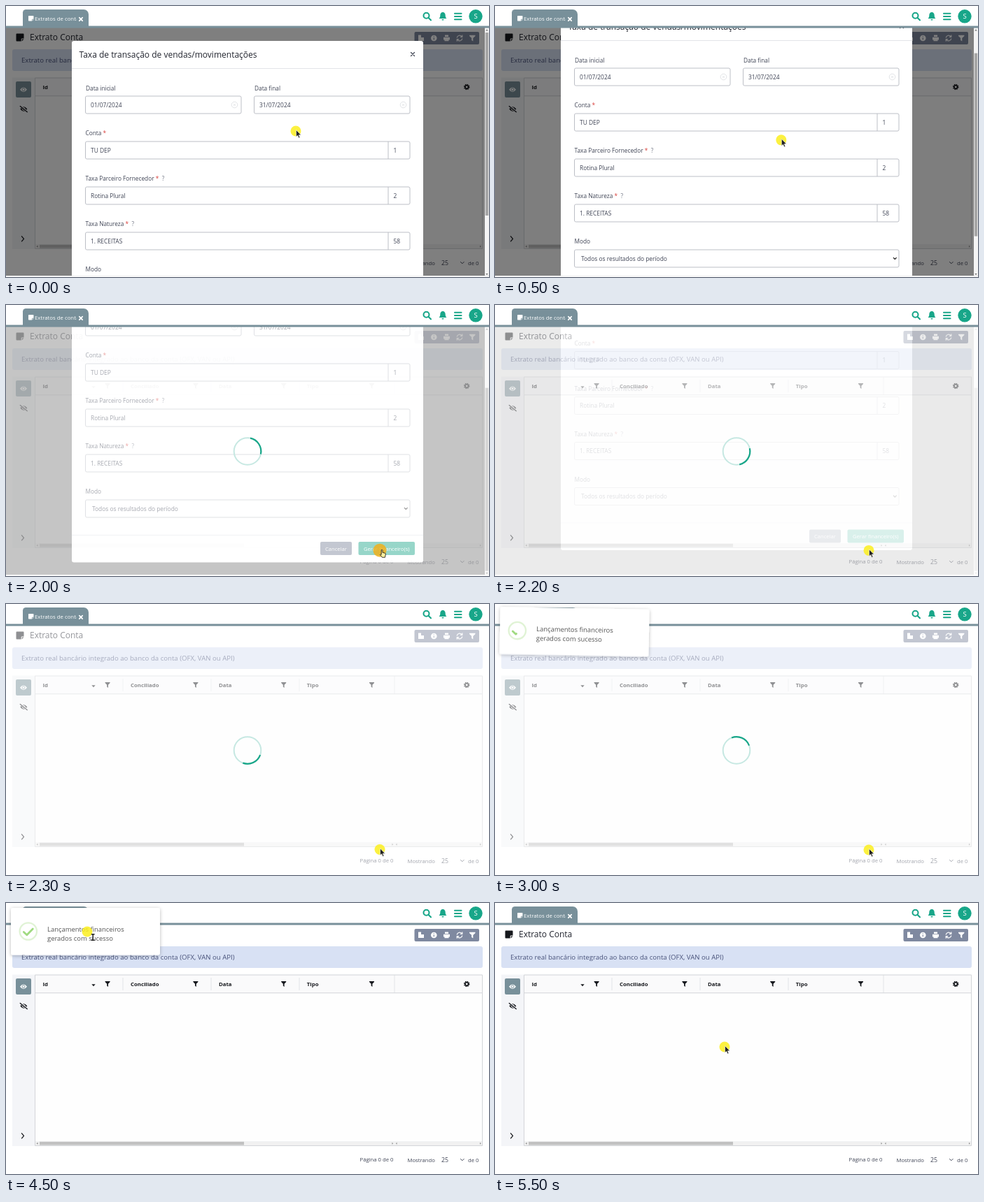
These frames come from a looping animation (690x388 px, 6.9 s). An HTML page:

```html
<!DOCTYPE html>
<html lang="pt-BR">
<head>
<meta charset="utf-8">
<title>Extrato Conta</title>
<style>
  html, body { margin: 0; width: 100%; height: 100%; overflow: hidden; background: #fff; }
  svg { display: block; }
  #stage { width: 100%; height: 100%; font: 8.3px "Open Sans", "Noto Sans", sans-serif; fill: #3f4455; }
  .h { font-size: 12px; font-weight: 500; fill: #22252f; }
  .th { font-size: 7.8px; font-weight: 700; fill: #16181d; }
  .val { font-size: 8.4px; }
  .foot { font-size: 7.7px; }
  .btn { font-size: 7.6px; fill: #fff; }
  .box { fill: #fff; stroke: #bcbfc6; }
  .line { fill: none; stroke: #e2e4e8; }
  .ink { fill: #16181d; }
  .white { fill: #fff; }
  .green { fill: #18a689; }
  .req { fill: #d9433f; }
  .hint { fill: #767b88; }
  .stroke { fill: none; stroke-linecap: round; stroke-linejoin: round; }
</style>
</head>
<body>
<svg id="stage" viewBox="0 0 690 388">
  <defs>
    <clipPath id="tabClip"><rect x="41" y="8" width="59.5" height="20"/></clipPath>
    <clipPath id="pageClip"><rect y="31" width="690" height="355.5"/></clipPath>
    <filter id="shadow" x="-10%" y="-20%" width="120%" height="140%">
      <feDropShadow dx="0" dy="1" stdDeviation="2.5" flood-opacity=".28"/>
    </filter>
    <path id="funnel" d="M0 0h7v1L4.4 3.8V8L2.6 6.6V3.8L0 1z"/>
    <path id="note" d="M1 0h9a1 1 0 0 1 1 1v6H8.2a1 1 0 0 0-1 1v3H1a1 1 0 0 1-1-1V1a1 1 0 0 1 1-1zM8.2 8H11L8.2 11z"/>
    <g id="eye">
      <path d="M-5 0Q0-6.6 5 0Q0 6.6-5 0z"/>
      <circle r="2" fill="none" stroke="var(--iris)" stroke-width=".9"/>
    </g>
  </defs>

  <!-- page -->
  <use href="#note" x="14.5" y="39.5" class="ink"/>
  <text x="34" y="49.2" class="h">Extrato Conta</text>
  <rect x="583.5" y="37" width="92.5" height="18" rx="2" fill="#7f89a0"/>
  <g class="white">
    <path d="M589 41.5h4v3.5h4v5h-8z"/>
    <circle cx="611.3" cy="46" r="4.3"/>
    <path d="M627 41.5h5v2.5h-5zM625 44.8h9v3.7h-1.5v1.7h-6v-1.7H625z"/>
    <use href="#funnel" transform="translate(662 41.8) scale(1.2 1.08)"/>
  </g>
  <path d="M611.3 45.5v2.8M611.3 43.3v.9" stroke="#7f89a0" stroke-width="1.2"/>
  <path d="M644.3 45.2a3.8 3.8 0 0 1 6.6-1.8m.9-1.6v2.5h-2.5M651.700 46.800a3.800 3.800 0 0 1-6.600 1.800m-.9 1.600v-2.500h2.500" class="stroke" stroke="#fff" stroke-width="1.2"/>
  <rect x="9" y="62" width="672" height="31" rx="3" fill="#d8e1f4"/>
  <text x="22" y="80.8" font-size="9.62" fill="#48527a">Extrato real bancário integrado ao banco da conta (OFX, VAN ou API)</text>

  <rect x="9" y="102.500" width="672" height="245.500" fill="#f4f5f8"/>
  <rect x="41.500" y="129" width="639" height="212" fill="#fefefe"/>
  <rect x="41.500" y="103" width="639" height="25.500" fill="#fafafb"/>
  <path class="line" d="M167 107v18M293 107v18M419 107v18M555 103v26"/>
  <path class="line" style="stroke:#d3d5d9" d="M41.500 103H680.500V347.500H41.500zM41.500 128.800H680.500"/>
  <rect x="42" y="341.300" width="638" height="5.700" fill="#f1f1f1"/>
  <rect x="48" y="341.800" width="292" height="4.700" fill="#c1c1c1"/>
  <path d="M45.500 342.700v3l-2-1.500zM551.500 342.700v3l1.600-1.500zM558.500 342.700v3l-1.600-1.500zM677 342.700v3l1.600-1.500z" fill="#8a8a8a"/>
  <rect x="14" y="108" width="22" height="23" rx="2" fill="#78909a"/>
  <use href="#eye" transform="translate(25 119.700)" class="white" style="--iris:#78909a"/>
  <use href="#eye" transform="translate(25.300 147.500)" class="ink" style="--iris:#f4f5f8"/>
  <path d="M20.500 143.200l10 8.400" stroke="#f4f5f8" stroke-width="2.600"/>
  <path d="M20.300 143.500l10 8.200M22.500 329.800l3 3.500-3 3.500" class="stroke" stroke="#16181d" stroke-width="1.300"/>
  <g class="th">
    <text x="52.500" y="119">Id</text>
    <text x="178" y="119">Conciliado</text>
    <text x="304" y="119">Data</text>
    <text x="429.800" y="119">Tipo</text>
    <path d="M122.300 116.300h5.400L125 119.200z"/>
    <use href="#funnel" x="141.600" y="112"/>
    <use href="#funnel" x="267.400" y="112"/>
    <use href="#funnel" x="393.200" y="112"/>
    <use href="#funnel" x="519" y="112"/>
  </g>
  <g fill="none" stroke="#16181d">
    <circle cx="658.200" cy="116" r="2.300" stroke-width="1.700"/>
    <circle cx="658.200" cy="116" r="3.600" stroke-width="1.300" stroke-dasharray="1.600 1.227"/>
  </g>
  <g class="foot">
    <text x="505.500" y="370.300">Página 0 de 0</text>
    <text x="573.500" y="370.800">Mostrando</text>
    <text x="622" y="371.200" font-size="8.800">25</text>
    <text x="660" y="370.800">de 0</text>
  </g>
  <path d="M649.500 366.500l2.300 2.300 2.300-2.300" class="stroke" stroke="#3f4455"/>

  <!-- dialog -->
  <g id="dialog" clip-path="url(#pageClip)">
    <rect y="31" width="690" height="355.500" fill-opacity=".5" fill="#000"/>
    <rect x="684" y="31" width="6" height="355.500" fill="#f4f4f4"/>
    <path d="M685.300 35.500h3.400L687 33.300zM685.300 383h3.400L687 385.200z" fill="#777"/>
    <rect id="thumb" x="684.800" y="38" width="4.400" height="262" fill="#a6a6a6"/>
    <g id="panel">
      <rect x="94" y="50" width="502" height="428.500" rx="3" fill="#fff"/>
      <text x="104.500" y="74" class="h">Taxa de transação de vendas/movimentações</text>
      <path d="M578.500 66.500l5 5m0-5l-5 5" class="stroke" stroke="#454a57" stroke-width="1.300"/>
      <path class="line" d="M94 89.500H596M94 439.500H596"/>
      <g id="fields"></g>
      <rect x="449" y="449" width="45" height="19" rx="2" fill="#7b8499"/>
      <rect x="503.500" y="449" width="80.500" height="19" rx="2" class="green"/>
      <text x="456" y="461.500" class="btn">Cancelar</text>
      <text x="511" y="461.500" class="btn">Gerar financeiro(s)</text>
    </g>
  </g>

  <!-- loading veil -->
  <g id="veil">
    <rect y="31" width="690" height="357" fill="#fff" fill-opacity=".52"/>
    <circle cx="345" cy="209.500" r="19.300" fill="none" stroke="#c6e8e2" stroke-width="2"/>
    <path id="arc" d="M364.300 209.500A19.300 19.300 0 0 1 345 228.800" fill="none" stroke="#18a689" stroke-width="2.200"/>
  </g>

  <!-- top bar -->
  <rect width="690" height="29" fill="#fff"/>
  <path d="M24 30V9.500a4.500 4.500 0 0 1 4.500-4.500H111a7 7 0 0 1 7 7V30z" fill="#78909a"/>
  <rect y="28.500" width="690" height="3" fill="#78909a"/>
  <use href="#note" transform="translate(32 14) scale(.68)" class="white"/>
  <text x="41" y="20.800" font-size="7.800" class="white" clip-path="url(#tabClip)">Extratos de contas</text>
  <path d="M104.800 16.700l4.400 4.400m0-4.400l-4.400 4.400" class="stroke" stroke="#fff" stroke-width="1.700"/>
  <g class="stroke" stroke="#18a689" stroke-width="2.100">
    <circle cx="600.500" cy="13.800" r="4"/>
    <path d="M603.700 17l3.300 3.300M641 10.800h9.500M641 15h9.500M641 19.200h9.500"/>
  </g>
  <g class="green">
    <path d="M624 8.800c2.800.4 3.700 2.500 3.700 4.700 0 2.500.8 3.400 1.800 4.500H618.500c1-1.100 1.800-2 1.800-4.500 0-2.200.9-4.300 3.700-4.700zM622.400 19h3.200a1.600 1.600 0 0 1-3.200 0z"/>
    <circle cx="671" cy="14.800" r="9.700"/>
  </g>
  <text x="671" y="18.300" font-size="9.500" text-anchor="middle" class="white">S</text>

  <!-- toast -->
  <g id="toast">
    <rect x="7" y="7" width="213" height="67.500" rx="3" fill="#fff" filter="url(#shadow)"/>
    <circle cx="31.800" cy="40.500" r="12.200" fill="none" stroke="#a5dc86" stroke-opacity=".35" stroke-width="2.300"/>
    <path id="tick" d="M25.300 41.500l4.500 4.300 8.500-8.800" pathLength="1" stroke-dasharray="1 2" class="stroke" stroke="#a0da80" stroke-width="2.800"/>
    <g font-size="9.430" fill="#545454">
      <text x="59" y="41">Lançamentos financeiros</text>
      <text x="59" y="54.300">gerados com sucesso</text>
    </g>
  </g>

  <!-- pointer -->
  <g id="pointer">
    <circle id="halo" r="7.500" fill-opacity=".85"/>
    <path id="arrow" d="M.5-1.500v9.800l2.200-2 1.500 3.700 1.700-.7-1.500-3.600h3.100z" fill="#222" stroke="#fff" stroke-width=".6"/>
    <path id="hand" d="M2.200-.5q1.200-1 1.800.3v3.400l3.200.7q1.300.4 1.100 1.800l-.8 4.300H3.300L.4 6.300q.3-1.300 1.800-.2z" fill="#fff2a0" stroke="#222" stroke-width=".9"/>
    <path id="beam" d="M5.800 3.700h4.800M8.200 3.700v8.600M5.800 12.300h4.800" fill="none" stroke="#222" stroke-width="1.500"/>
  </g>
</svg>

<script>
const $ = id => document.getElementById(id);
const LOOP = 6900, TICK = 100;

// Dialog form
const label = (x, y, text, req, hint) =>
  `<text x="${x}" y="${y}">${text}${req ? ' <tspan class="req">*</tspan>' : ''}` +
  `${hint ? '<tspan class="hint" dx="4.500">?</tspan>' : ''}</text>`;
const box = (x, y, w) => `<rect class="box" x="${x}" y="${y}" width="${w}" height="25" rx="2"/>`;
const value = (x, y, text) => `<text class="val" x="${x}" y="${y + 15.6}">${text}</text>`;

const dateField = (x, name, date) => label(x, 120.6, name) +
  box(x - 0.5, 129, 222.5) + value(x + 7, 129, date) +
  `<g fill="none" stroke="#dadce0" stroke-width=".8"><circle cx="${x + 212.5}" cy="141.500" r="4.300"/>` +
  `<path d="M${x + 211} 140l3 3m0-3l-3 3"/></g>`;

const codeField = (y, name, text, code, hint) => label(113.5, y - 8.6, name, true, hint) +
  box(113.5, y, 463.5) + `<path d="M546 ${y}v25" stroke="#bcbfc6"/>` +
  value(121, y, text) + value(553.5, y, code);

$('fields').innerHTML =
  dateField(114, 'Data inicial', '01/07/2024') +
  dateField(355, 'Data final', '31/07/2024') +
  codeField(194, 'Conta', 'TU DEP', 1) +
  codeField(259, 'Taxa Parceiro Fornecedor', 'Rotina Plural', 2, true) +
  codeField(324, 'Taxa Natureza', '1. RECEITAS', 58, true) +
  label(113.5, 380.4, 'Modo') + box(113.5, 389, 463.5) +
  value(123, 389, 'Todos os resultados do período') +
  '<path d="M569.300 400.500l2 2 2-2" class="stroke" stroke="#333" stroke-width="1.200"/>';

// Tracks: [tick, ...values], linear in between
const scroll = [[3, 0], [4, 14], [6, 66], [8, 104], [9, 109]];
const close = [[19, 1, 0], [20, .94, 1], [21, .66, 9], [23, 0, 28], [68, 0, 28]];
const veil = [[18, 0], [20, 1], [31, 1], [33, 0]];
const toast = [[26, 0, 1.5, -3], [27, 1, 1.2, -1], [28, 1, -1.2, 0], [30, 1, 1, -1], [31, 1, 0, 0], [50, 1, 0, 0], [51, 0, 1, 0]];
const tick = [[28, 0], [33, 1]];
const path = [
  [0, 414, 179], [3, 414, 179], [10, 396, 224], [11, 436, 302], [12, 469, 350],
  [14, 515, 350], [16, 534, 351], [31, 534, 352], [33, 478, 333], [35, 357, 280],
  [38, 193, 103], [40, 96, 46], [41, 62, 34], [43, 92, 38], [45, 116, 41],
  [50, 116, 41], [54, 93, 55], [55, 328, 206]
];

function at(track, k) {
  const i = track.findIndex(key => key[0] > k);
  if (i < 0) return track[track.length - 1].slice(1);
  if (i === 0) return track[0].slice(1);
  const a = track[i - 1], b = track[i], f = (k - a[0]) / (b[0] - a[0]);
  return a.slice(1).map((v, j) => v + (b[j + 1] - v) * f);
}

const within = (k, from, to) => k >= from && k <= to;
const show = (id, on) => $(id).style.display = on ? '' : 'none';
const move = (id, transform) => $(id).setAttribute('transform', transform);
const fade = (id, opacity) => { $(id).style.opacity = opacity; show(id, opacity > 0); };

function draw(k) {
  const [top] = at(scroll, k), [dialogAlpha, lift] = at(close, k);
  fade('dialog', dialogAlpha);
  move('panel', `translate(0 ${-top - lift})`);
  move('thumb', `translate(0 ${top * .74})`);

  fade('veil', at(veil, k)[0]);
  move('arc', `rotate(${32.7 * (k - 20) - 78} 345 209.5)`);

  const [alpha, tilt, drop] = at(toast, k), [drawn] = at(tick, k);
  fade('toast', alpha);
  move('toast', `translate(0 ${drop}) rotate(${tilt} 113.5 41)`);
  $('tick').setAttribute('stroke-dashoffset', 1 - drawn);
  show('tick', drawn > 0);

  const [x, y] = at(path, k), clicked = within(k, 18, 20);
  const hand = within(k, 12, 21), beam = within(k, 40, 50);
  move('pointer', `translate(${x} ${y})`);
  $('halo').setAttribute('r', clicked ? 9.5 : 7.5);
  $('halo').setAttribute('fill', clicked ? '#efb01c' : '#fbee1e');
  show('hand', hand);
  show('beam', beam);
  show('arrow', !hand && !beam);
}

const start = performance.now();
let last = -1;
function loop() {
  const k = Math.floor((performance.now() - start) % LOOP / TICK);
  if (k !== last) draw(last = k);
  requestAnimationFrame(loop);
}
loop();
</script>
</body>
</html>
```
